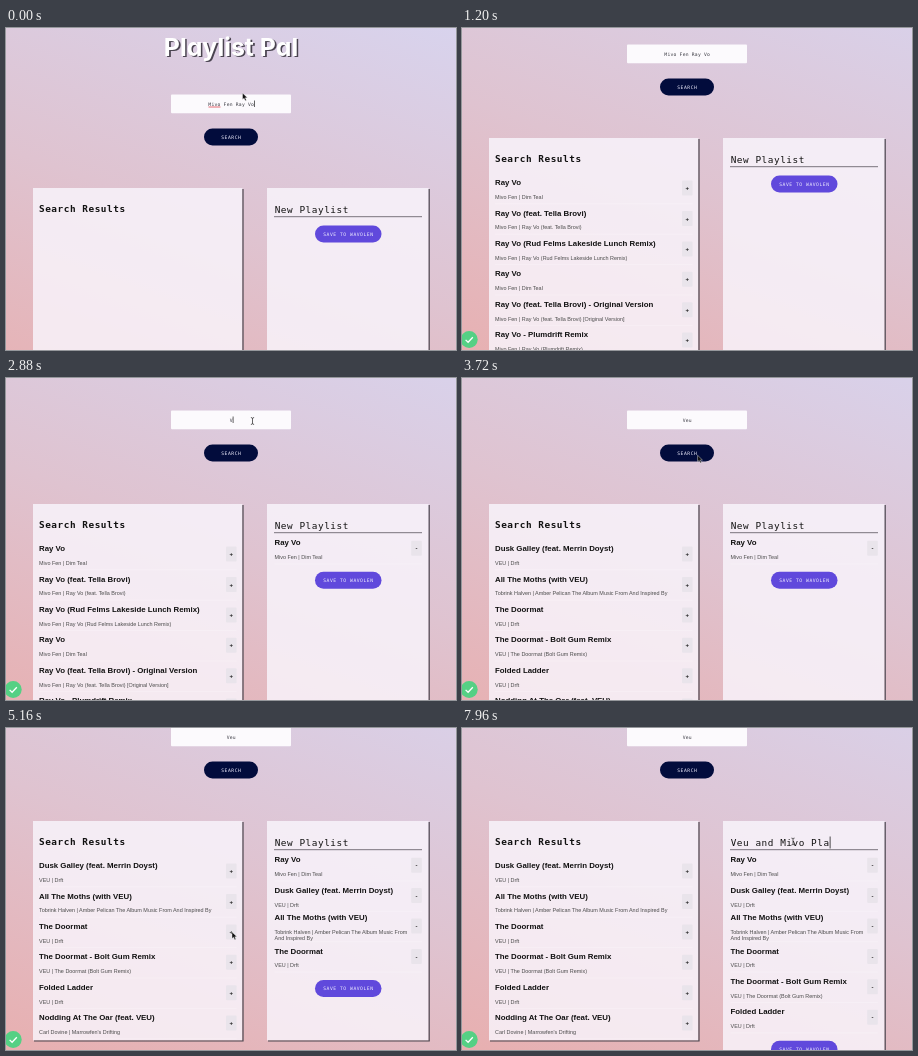
Animation of 450 by 322 pixels, one loop 8000 ms. Source, as an HTML page:

```html
<!DOCTYPE html>
<html lang="en">
<head>
<meta charset="utf-8">
<title>Playlist Pal</title>
<style>
  html, body { margin: 0; width: 100%; height: 100%; overflow: hidden; }
  svg { display: block; width: 450px; height: 322px; }
  .brand { font: 700 24.9px Inter, sans-serif; font-feature-settings: "cv11"; text-anchor: middle; }
  .mono { font-family: "DejaVu Sans Mono", "Noto Sans Mono", monospace; }
  .head { font-size: 9.4px; letter-spacing: .54px; fill: #111; }
  .field { font-size: 4.7px; letter-spacing: .23px; fill: #3a3a42; }
  .label { font-size: 4.7px; letter-spacing: .53px; fill: #f0eeff; text-anchor: middle; }
  .song { font: 700 7.85px "Liberation Sans", Arial, sans-serif; fill: #111; }
  .info { font: 5.45px "Liberation Sans", Arial, sans-serif; fill: #4a4a4a; }
  .sign { font: 700 6px "Liberation Sans", Arial, sans-serif; fill: #222; text-anchor: middle; }
</style>
</head>
<body>
<svg viewBox="0 0 450 322" xmlns="http://www.w3.org/2000/svg">
  <defs>
    <linearGradient id="sky" gradientUnits="userSpaceOnUse" x1="133" y1="454" x2="317" y2="-48">
      <stop offset="0" stop-color="#e8aeae"/>
      <stop offset=".5" stop-color="#dfc3d0"/>
      <stop offset="1" stop-color="#d8d3ed"/>
    </linearGradient>
  </defs>
  <g id="page">
    <rect width="450" height="420" fill="url(#sky)"/>
    <text class="brand" x="226.6" y="29.2" fill="#4a4450">Playlist Pal</text>
    <text class="brand" x="225" y="27.6" fill="#fff">Playlist Pal</text>

    <rect x="165" y="66.4" width="120" height="18.8" rx="1" fill="#fcfafd"/>
    <text id="query" class="mono field" y="77.7"></text>
    <path id="spelling" d="M202.5 79h12" stroke="#e0454f" stroke-width=".8"/>
    <rect id="queryCaret" y="72.5" width=".7" height="6.5" fill="#222"/>

    <rect x="198" y="100.4" width="54" height="17" rx="8.5" fill="#020c3c"/>
    <text class="mono label" x="225.3" y="110.6">SEARCH</text>

    <g id="leftPanel"></g>
    <g id="rightPanel"></g>
    <text class="mono head" x="33" y="184" font-weight="700">Search Results</text>
    <g id="firstResults"></g>
    <g id="secondResults"></g>

    <rect id="selection" x="268.7" y="175.3" width="74.4" height="12.6" fill="#e9b9b5"/>
    <text id="listName" class="mono head" x="268.7" y="185.4"></text>
    <rect id="nameCaret" y="175.5" width=".8" height="12" fill="#222"/>
    <path d="M268 188.7h148" stroke="#5a555f" stroke-width=".8"/>
    <g id="playlist"></g>
    <g id="save">
      <rect x="309" y="197.4" width="66.5" height="17" rx="8.5" fill="#6049dc"/>
      <text class="mono label" x="342.4" y="207.6">SAVE TO WAVOLEN</text>
    </g>
  </g>
  <g id="badge">
    <circle cx="7.2" cy="311.6" r="8.5" fill="#55d084"/>
    <path d="M3.6 311.9l2.5 2.4 4.7-5" fill="none" stroke="#fff" stroke-width="1.3"/>
  </g>
  <path id="arrow" d="M0 0v6.6l1.6-1.4 1.1 2.5 1.2-.5-1.1-2.4h2.1z" fill="#111" stroke="#fff" stroke-width=".4"/>
  <path id="beam" d="M-1.6-3.4q1.6 0 1.6 1q0-1 1.6-1M0-2.4v4.8M-1.6 3.4q1.6 0 1.6-1q0 1 1.6 1" fill="none" stroke="#222" stroke-width=".7"/>
</svg>
<script>
const LOOP = 8000, PITCH = 30.4;
const $ = id => document.getElementById(id);
const show = (id, on) => $(id).setAttribute('display', on ? 'inline' : 'none');
const move = (id, x, y) => $(id).setAttribute('transform', `translate(${x} ${y})`);

const firstSongs = [
  ['Ray Vo', 'Mivo Fen | Dim Teal'],
  ['Ray Vo (feat. Tella Brovi)', 'Mivo Fen | Ray Vo (feat. Tella Brovi)'],
  ['Ray Vo (Rud Felms Lakeside Lunch Remix)', 'Mivo Fen | Ray Vo (Rud Felms Lakeside Lunch Remix)'],
  ['Ray Vo', 'Mivo Fen | Dim Teal'],
  ['Ray Vo (feat. Tella Brovi) - Original Version', 'Mivo Fen | Ray Vo (feat. Tella Brovi) [Original Version]'],
  ['Ray Vo - Plumdrift Remix', 'Mivo Fen | Ray Vo (Plumdrift Remix)']
];
const secondSongs = [
  ['Dusk Galley (feat. Merrin Doyst)', 'VEU | Drft'],
  ['All The Moths (with VEU)', 'Tobrink Halven | Amber Pelican The Album Music From And Inspired By'],
  ['The Doormat', 'VEU | Drft'],
  ['The Doormat - Bolt Gum Remix', 'VEU | The Doormat (Bolt Gum Remix)'],
  ['Folded Ladder', 'VEU | Drft'],
  ['Nodding At The Oar (feat. VEU)', "Carl Dovine | Marrowfen's Drifting"]
];

function row([song, info], i, x, y, signX, sign) {
  const top = y + i * PITCH;
  const cut = sign === '-' && info.length > 60 ? info.indexOf(' And ') : -1;
  const lines = cut < 0 ? [info] : [info.slice(0, cut), info.slice(cut + 1)];
  const lift = (lines.length - 1) * 3.2;
  return `<g><text class="song" x="${x}" y="${top - lift}">${song}</text>` +
    lines.map((s, n) => `<text class="info" x="${x}" y="${top + 13.8 - lift + n * 6.4}">${s}</text>`).join('') +
    `<rect x="${signX - 5.3}" y="${top - 4.6}" width="10.6" height="15" rx="1" fill="#e9e4eb"/>` +
    `<text class="sign" x="${signX}" y="${top + 5}">${sign}</text>` +
    `<path d="M${x} ${top + 18.6}H${signX + 5.3}" stroke="#fff" stroke-opacity=".4" stroke-width=".5"/></g>`;
}
const results = songs => songs.map((s, i) => row(s, i, 33, 207.2, 225.3, '+')).join('');
$('firstResults').innerHTML = results(firstSongs);
$('secondResults').innerHTML = results(secondSongs);
$('playlist').innerHTML = [firstSongs[0], ...secondSongs.slice(0, 5)]
  .map((s, i) => row(s, i, 268.5, 201.3, 410.5, '-')).join('');

function panel(id, x, w, h) {
  $(id).innerHTML = `<rect x="${x}" y="160" width="${w}" height="${h}" fill="#f9f6fd" fill-opacity=".82"/>` +
    `<path d="M${x + w + .6} 161v${h - .4}H${x + 1}" fill="none" stroke="#4b464f" stroke-width="1.2"/>`;
}
panel('leftPanel', 27, 209.4, 219.4);

// Keys are [time, value...]; values ease between neighbours.
function track(keys, t) {
  const n = keys.findIndex(k => k[0] > t);
  if (n === 0) return keys[0].slice(1);
  if (n < 0) return keys[keys.length - 1].slice(1);
  const a = keys[n - 1], b = keys[n], u = (t - a[0]) / (b[0] - a[0]), e = u * u * (3 - 2 * u);
  return a.slice(1).map((v, i) => v + (b[i + 1] - v) * e);
}
const scrollKeys = [[1000, 0], [1200, 50], [1320, 50], [1560, 84], [2200, 84], [2480, 34], [3880, 34], [4080, 67]];
const pointerKeys = [
  [40, 236.5, 65], [360, 226, 108], [1240, 226, 108], [1520, 226, 127], [1680, 226, 127], [1960, 298, 59],
  [2200, 298, 59], [2600, 246.5, 43], [3160, 246.5, 43], [3400, 227, 76], [3640, 227, 76], [4080, 323, 89.5],
  [4160, 323, 89.5], [4400, 226, 143], [4560, 226, 143], [4720, 226, 174], [4880, 226, 174],
  [5040, 226, 204], [5160, 226, 204], [5320, 226, 234], [5440, 226, 234], [5600, 226, 265],
  [5720, 226, 265], [6120, 328, 114], [6400, 328, 114], [6800, 331, 113.5]
];
const addTimes = [1640, 4480, 4800, 5120, 5400, 5680];
const typedName = 'Veu and Mivo Pla';

function queryAt(t) {
  if (t < 2720) return 'Mivo Fen Ray Vo';
  return 'Veu'.slice(0, t < 2840 ? 0 : t < 3040 ? 1 : t < 3160 ? 2 : 3);
}
function nameLength(t) {
  if (t < 7640) return Math.max(0, Math.min(13, Math.floor((t - 6440) / 88)));
  return 13 + Math.max(0, Math.min(3, Math.floor((t - 7720) / 80)));
}

let lastCount = -1;
function draw(t) {
  const [scroll] = track(scrollKeys, t), [px, py] = track(pointerKeys, t);
  move('page', 0, -scroll);

  const query = queryAt(t), width = query.length * 3.06;
  $('query').textContent = query;
  $('query').setAttribute('x', 225.3 - width / 2);
  $('queryCaret').setAttribute('x', 225.2 + width / 2);
  show('queryCaret', t < 400 || (t >= 2600 && t < 3400));
  show('spelling', t < 480);

  show('firstResults', t >= 760 && t < 3640);
  show('secondResults', t >= 3640);
  show('badge', t >= 760);

  const count = addTimes.filter(a => t >= a).length;
  if (count !== lastCount) {
    [...$('playlist').children].forEach((g, i) => g.setAttribute('display', i < count ? 'inline' : 'none'));
    move('save', 0, count * PITCH);
    panel('rightPanel', 261, 161.6, Math.max(219.4, 70 + count * PITCH));
    lastCount = count;
  }

  const typing = t >= 6440, length = nameLength(t);
  $('listName').textContent = typing ? typedName.slice(0, length) : 'New Playlist';
  $('nameCaret').setAttribute('x', 268.5 + length * 6.2);
  show('nameCaret', typing);
  show('selection', t >= 6220 && !typing);

  const overText = (t >= 2540 && t < 3240) || t >= 6040;
  show('arrow', !overText && (t < 960 || t >= 1280));
  show('beam', overText);
  move('arrow', px, py);
  move('beam', px, py);
}
function tick(now) {
  draw(now % LOOP);
  requestAnimationFrame(tick);
}
draw(0);
requestAnimationFrame(tick);
</script>
</body>
</html>
```
